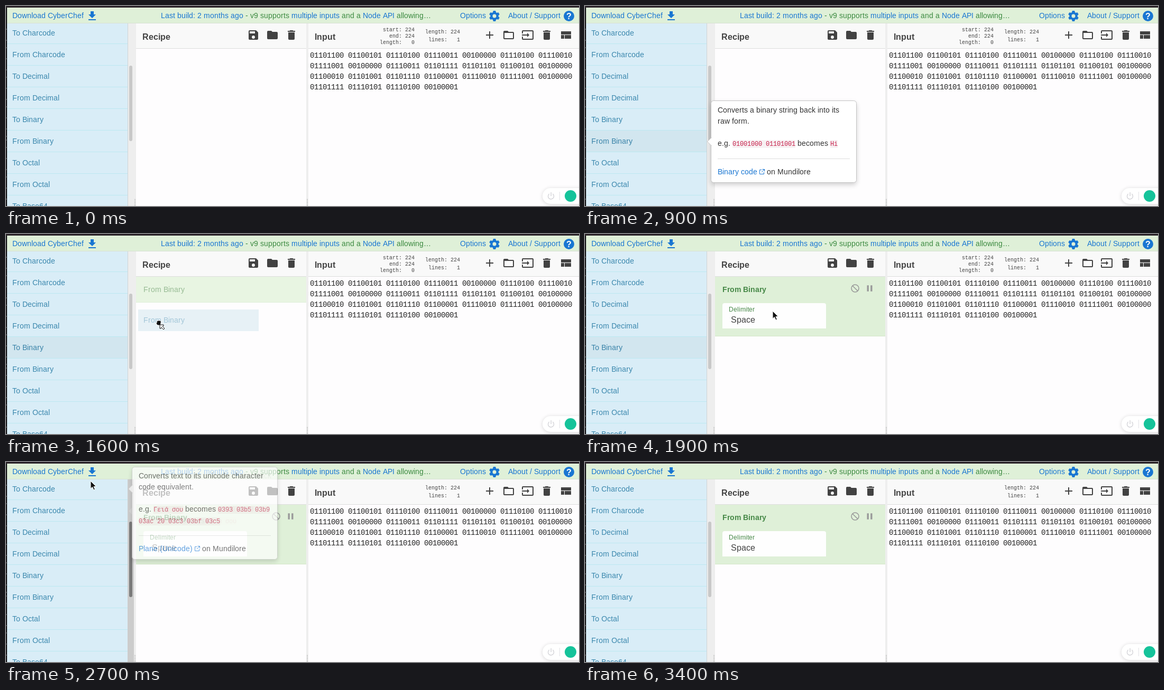
Recreate the animation shown at these times as an HTML page with a canvas. Size 1084 by 379 pixels, loop 3.6 s.

```html
<!DOCTYPE html>
<html lang="en">
<head>
<meta charset="utf-8">
<title>Recipe builder</title>
<style>
  html, body { margin: 0; width: 100%; height: 100%; overflow: hidden; background: #fff; }
  canvas { display: block; }
</style>
</head>
<body>
<canvas id="stage" width="1084" height="379"></canvas>
<script>
const W = 1084, H = 379, LOOP = 3600, STEP = 100;
const stage = document.getElementById('stage').getContext('2d');
let ctx = stage;

const SANS = '"Liberation Sans", Arial, sans-serif';
const MONO = '"Liberation Mono", "Courier New", monospace';
const body = '14px ' + SANS, bold = 'bold 14px ' + SANS, heading = 'bold 16px ' + SANS;
const code = '12px ' + MONO;
const BLUE = '#1976d2', GREEN = '#3c8a40', ROW_TEXT = '#3a87ad', DARK = '#424242';

const ICONS = {
  download: 'M19 9h-4V3H9v6H5l7 7 7-7zM5 18v2h14v-2H5z',
  save: 'M17 3H5c-1.1 0-2 .9-2 2v14c0 1.1.9 2 2 2h14c1.1 0 2-.9 2-2V7l-4-4zm-5 16c-1.7 0-3-1.3-3-3s1.3-3 3-3 3 1.3 3 3-1.3 3-3 3zm3-10H5V5h10v4z',
  folder: 'M10 4H4c-1.1 0-2 .9-2 2v12c0 1.1.9 2 2 2h16c1.1 0 2-.9 2-2V8c0-1.1-.9-2-2-2h-8l-2-2z',
  open: 'M20 6h-8l-2-2H4c-1.1 0-2 .9-2 2v12c0 1.1.9 2 2 2h16c1.1 0 2-.9 2-2V8c0-1.1-.9-2-2-2zm0 12H4V8h16v10z',
  bin: 'M6 19c0 1.1.9 2 2 2h8c1.1 0 2-.9 2-2V7H6v12zM19 4h-3.5l-1-1h-5l-1 1H5v2h14V4z',
  add: 'M19 13h-6v6h-2v-6H5v-2h6V5h2v6h6v2z',
  input: 'M21 3H3c-1.1 0-2 .9-2 2v4h2V5h18v14H3v-4H1v4c0 1.1.9 2 2 2h18c1.1 0 2-.9 2-2V5c0-1.1-.9-2-2-2zM11 16l4-4-4-4v3H1v2h10v3z',
  layout: 'M3 19h6v-7H3v7zm7 0h12v-7H10v7zM3 5v6h19V5H3z',
  pause: 'M6 19h4V5H6v14zm8-14v14h4V5h-4z'
};

function rect(x, y, w, h, color) {
  ctx.fillStyle = color;
  ctx.fillRect(x, y, w, h);
}

function rounded(x, y, w, h, r, color) {
  ctx.beginPath();
  ctx.roundRect(x, y, w, h, r);
  ctx.fillStyle = color;
  ctx.fill();
}

function disc(x, y, r, color) {
  ctx.beginPath();
  ctx.arc(x, y, r, 0, Math.PI * 2);
  ctx.fillStyle = color;
  ctx.fill();
}

function stroke(path, color, width) {
  ctx.strokeStyle = color;
  ctx.lineWidth = width;
  ctx.stroke(new Path2D(path));
}

function shape(path, x, y, scale, color, outline) {
  ctx.save();
  ctx.translate(x, y);
  ctx.scale(scale, scale);
  const p = new Path2D(path);
  ctx.fillStyle = color;
  ctx.fill(p);
  if (outline) {
    ctx.strokeStyle = outline;
    ctx.lineWidth = 1;
    ctx.stroke(p);
  }
  ctx.restore();
}

const icon = (name, x, y, color = DARK, scale = 1) => shape(ICONS[name], x, y, scale, color);

// Glyphs advance by whole pixels, as hinted text does.
const advances = new Map();
function advance(font, a, b) {
  const key = font + a + b;
  if (!advances.has(key)) {
    const width = s => ctx.measureText(s).width;
    const kern = b ? width(a + b) - width(a) - width(b) : 0;
    advances.set(key, Math.round(width(a)) + Math.round(kern));
  }
  return advances.get(key);
}

function text(str, x, y, font, color) {
  ctx.font = font;
  ctx.fillStyle = color;
  const chars = [...str];
  chars.forEach((ch, i) => {
    ctx.fillText(ch, x, y);
    x += advance(font, ch, chars[i + 1] || '');
  });
  return x;
}

// Text made of [string, style] runs on one line.
function runs(list, x, y) {
  for (const [str, style] of list) {
    if (style === 'code') {
      rect(x, y - 11, str.length * 7, 15, '#f7f1f3');
      x = text(str, x, y, code, '#c7254e');
    } else {
      x = text(str, x, y, body, style || '#333');
    }
  }
  return x;
}

function layer(draw) {
  const c = document.createElement('canvas');
  c.width = W;
  c.height = H;
  ctx = c.getContext('2d');
  draw();
  ctx = stage;
  return c;
}

function gear(x, y) {
  ctx.save();
  ctx.translate(x, y);
  disc(0, 0, 7.4, BLUE);
  for (let i = 0; i < 6; i++) {
    ctx.rotate(Math.PI / 3);
    ctx.beginPath();
    ctx.moveTo(-3.4, -6);
    ctx.lineTo(-2.1, -10);
    ctx.lineTo(2.1, -10);
    ctx.lineTo(3.4, -6);
    ctx.fill();
  }
  disc(0, 0, 3.5, '#dff0d8');
  ctx.restore();
}

function banner() {
  rect(0, 0, W, 3, '#2a2328');
  rect(2, 3, W - 2, 29, '#dff0d8');
  rect(2, 32, W - 2, 1, '#d8e2d4');
  text('Download CyberChef', 12, 23, body, BLUE);
  icon('download', 151, 7, BLUE);
  runs([['Last build: 2 months ago', BLUE], [' - v9 supports ', GREEN], ['multiple inputs', BLUE],
    [' and a ', GREEN], ['Node API', BLUE], [' allowing…', GREEN]], 293, 23);
  text('Options', 859, 23, body, BLUE);
  gear(924, 19);
  text('About / Support', 950, 23, body, BLUE);
  disc(1065, 19, 10, BLUE);
  text('?', 1060, 25, heading, '#fff');
}

function operations() {
  rect(0, 3, 2, H, '#131316');
  for (let y = 36; y < H; y += 7) {
    if (Math.sin(y * 12.9) > .35) rect(0, y, 1, 2, '#77777c');
  }
  rect(2, 33, 228, H, '#d9edf7');
  ['To Charcode', 'From Charcode', 'To Decimal', 'From Decimal', 'To Binary',
    'From Binary', 'To Octal', 'From Octal', 'To Base64'].forEach((name, i) => {
    text(name, 12, 56 + i * 41, body, ROW_TEXT);
    rect(2, 71 + i * 41, 228, 1, '#bce8f1');
  });
  rect(230, 33, 1, H, '#cfd4d6');
  rect(231, 33, 15, H, '#eee');
}

function panels() {
  rect(246, 33, W - 246, H, '#fefdfe');
  rect(246, 33, W - 246, 47, '#f9f9f9');
  rect(246, 80, W - 246, 1, '#ddd');
  rect(568, 33, 4, H, '#eee');
  for (let y = 366; y < H; y += 3) {
    rect(243, y, 2, 1, '#aaa');
    rect(569, y, 2, 1, '#aaa');
  }
  text('Recipe', 258, 64, heading, DARK);
  text('Input', 584, 64, heading, DARK);
  ['save', 'folder', 'bin'].forEach((name, i) => icon(name, 456 + i * 36, 43));
  ['add', 'open', 'input', 'bin', 'layout'].forEach((name, i) => icon(name, 903 + i * 36, 43));
  stats(['length: 224', ' lines:   1'], 793, 52, 15);
  ['01101100 01100101 01110100 01110011 00100000 01110100 01110010',
    '01111001 00100000 01110011 01101111 01101101 01100101 00100000',
    '01100010 01101001 01101110 01100001 01110010 01111001 00100000',
    '01101111 01110101 01110100 00100001'
  ].forEach((line, i) => text(line, 575, 98 + i * 20, '14px ' + MONO, '#222'));
}

function stats(lines, x, y, pitch) {
  lines.forEach((line, i) => text(line, x, y + i * pitch, '10px ' + MONO, '#444'));
}

function assistant() {
  ctx.save();
  ctx.shadowColor = 'rgba(0,0,0,.16)';
  ctx.shadowBlur = 7;
  ctx.shadowOffsetY = 1;
  rounded(1015, 345, 90, 30, 15, '#fff');
  ctx.restore();
  ctx.beginPath();
  ctx.arc(1031, 360.5, 5.5, -Math.PI * .3, Math.PI * 1.3);
  ctx.strokeStyle = '#d0d0d5';
  ctx.lineWidth = 1.3;
  ctx.stroke();
  rect(1030.5, 353, 1.3, 7, '#d0d0d5');
  rect(1047, 352, 1, 16, '#e2e2e6');
  disc(1068, 360, 11, '#15c39a');
}

const page = layer(() => {
  operations();
  panels();
  banner();
  assistant();
});

function tooltip({ top, height, arrow, lines, link }) {
  return layer(() => {
    const box = new Path2D();
    box.roundRect(238.5, top + .5, 275, height, 5);
    ctx.save();
    ctx.shadowColor = 'rgba(0,0,0,.2)';
    ctx.shadowBlur = 10;
    ctx.shadowOffsetY = 4;
    ctx.fillStyle = '#fff';
    ctx.fill(box);
    ctx.restore();
    ctx.strokeStyle = '#c4c4c4';
    ctx.stroke(box);
    shape(`M239.5 ${arrow - 8}L231.5 ${arrow}L239.5 ${arrow + 8}`, 0, 0, 1, '#fff', '#c4c4c4');
    rect(239, arrow - 7, 2, 14, '#fff');
    lines.forEach(([dy, list]) => runs(list, 251, top + dy));
    const base = top + height - 15;
    rect(251, base - 30, 250, 1, '#ddd');
    const end = text(link, 251, base, body, BLUE);
    ctx.save();
    ctx.translate(end + 4, base - 10);
    stroke('M4 1.5H.5V9.5H8.5V6M5.5 .5H9.5V4.5M9.5 .5L4 6', BLUE, 1);
    ctx.restore();
    text('on Mundilore', end + 18, base, body, '#333');
  });
}

const binaryTip = tooltip({
  top: 179, height: 155, arrow: 257, link: 'Binary code',
  lines: [
    [23, [['Converts a binary string back into its']]],
    [44, [['raw form.']]],
    [86, [['e.g. '], ['01001000 01101001', 'code'], [' becomes '], ['Hi', 'code']]]
  ]
});
const toCharTip = tooltip({
  top: 9, height: 175, arrow: 51, link: 'Plane (Unicode)',
  lines: [
    [22, [['Converts text to its unicode character']]],
    [43, [['code equivalent.']]],
    [85, [['e.g. '], ['Γειά σου', 'code'], [' becomes '], ['0393 03b5 03b9', 'code']]],
    [107, [['03ac 20 03c3 03bf 03c5', 'code']]]
  ]
});
const fromCharTip = tooltip({
  top: 9, height: 175, arrow: 93, link: 'Plane (Unicode)',
  lines: [
    [22, [['Converts unicode character codes back']]],
    [43, [['into text.']]],
    [85, [['e.g. '], ['0393 03b5 03b9 03ac 20 03c3', 'code']]],
    [107, [['03bf 03c5', 'code'], [' becomes '], ['Γειά σου', 'code']]]
  ]
});

// Piecewise linear value over time from [time, ...values] keys.
function track(keys, t, field = 1) {
  const next = keys.findIndex(k => k[0] > t);
  if (next === 0) return keys[0][field];
  if (next < 0) return keys[keys.length - 1][field];
  const a = keys[next - 1], b = keys[next];
  return a[field] + (b[field] - a[field]) * (t - a[0]) / (b[0] - a[0]);
}

const focusKeys = [[1100, 0], [1300, 1], [1400, 1], [1600, 0], [2000, 0], [2200, 1], [3200, 1], [3400, 0]];
const binaryTipKeys = [[600, 0], [700, .03], [850, 1], [1400, 1], [1600, 0]];
const fromCharKeys = [[2400, 0], [2500, .3], [2600, .7], [2700, .14], [2800, 0]];
const toCharKeys = [[2500, 0], [2600, .5], [2700, .62], [2800, .1], [2900, 0]];
const dragKeys = [[1500, 130, 215], [1600, 289, 170], [1700, 330, 165]];
const arrowKeys = [[1800, 345, 150], [1900, 355, 146], [2000, 355, 146], [2200, 368, 141], [2400, 368, 141],
  [2500, 232, 95], [2600, 180, 60], [2700, 160, 36], [2800, 160, 12], [2900, 165, -8]];
const hovers = [[700, 1500, 5], [1500, 2300, 4], [2500, 2600, 1], [2600, 2700, 0]];

function scrollbar(focus) {
  const mix = (a, b) => Math.round(a + (b - a) * focus);
  const gray = v => `rgb(${v},${v},${v})`;
  if (focus) rect(230, 33, 12, H, `rgba(204,204,204,${focus})`);
  rounded(233, 113, 6, 143, 3, gray(mix(200, 122)));
}

function operation(t) {
  if (t < 1600) return;
  if (t < 1800) {
    rect(246, 81, 322, 48, '#e8f5e2');
    rect(246, 129, 322, 1, '#dfeeda');
    text('From Binary', 260, 110, body, '#97bb94');
    return;
  }
  rect(246, 81, 322, 112, '#dff0d8');
  rect(246, 193, 322, 1, '#d3e6c8');
  text('From Binary', 260, 110, bold, '#468847');
  ctx.beginPath();
  ctx.arc(511, 103, 7, 0, Math.PI * 2);
  ctx.strokeStyle = '#999';
  ctx.lineWidth = 1.6;
  ctx.stroke();
  stroke('M506 98L516 108', '#999', 1.6);
  icon('pause', 528.5, 93, '#999', .833);
  rounded(260, 131, 196, 48, [4, 4, 0, 0], '#fefefe');
  text('Delimiter', 272, 147, '12px ' + SANS, '#468847');
  text('Space', 276, 168, '16px ' + SANS, DARK);
}

function openHand(x, y) {
  shape('M-4 7L-7 2Q-8 0-6 0L-4 2L-6-4Q-5-6-4-5L-2-1L-2-6Q-1-8 0-6L1-1L2-6Q3-7 4-5L4 0L6-4Q8-4 7-2L5 7Z', x, y, 1, '#fff', '#111');
}

function dragging(x, y) {
  rect(x - 39, y - 27, 228, 41, 'rgba(229,240,246,.92)');
  text('From Binary', x - 29, y - 2, body, '#a2c6d8');
  shape('M-4-1Q-4-4-2-5L3-5Q5-4 4 0L3 4H-2L-5 1Z', x, y - 1, 1, '#111', '#fff');
  shape('M2 2H9V4L7 5L11 9L9 11L5 7L4 9H2Z', x, y, 1, '#fff', '#111');
}

function arrow(x, y) {
  shape('M0 0V14.5L3.4 11.4L6 17L8.4 16L6 10.5H10.5Z', x, y, 1, '#111', '#fff');
}

function fade(image, alpha) {
  if (alpha <= 0) return;
  ctx.globalAlpha = alpha;
  ctx.drawImage(image, 0, 0);
  ctx.globalAlpha = 1;
}

function render(t) {
  ctx.drawImage(page, 0, 0);
  for (const [from, to, row] of hovers) {
    if (t >= from && t < to) rect(2, Math.max(33, 31 + row * 41), 228, row ? 40 : 38, 'rgba(0,0,0,.03)');
  }
  scrollbar(track(focusKeys, t));
  if (t < 2300) {
    stats(['start: 224', '  end: 224'], 713, 48, 12);
    stats(['length:   0'], 707, 72, 0);
  }
  operation(t);
  fade(binaryTip, track(binaryTipKeys, t));
  fade(fromCharTip, track(fromCharKeys, t));
  fade(toCharTip, track(toCharKeys, t));

  if (t >= 1200 && t < 1500) openHand(49, 259);
  else if (t >= 1500 && t < 1800) dragging(Math.round(track(dragKeys, t)), Math.round(track(dragKeys, t, 2)));
  else if (t >= 1800 && t < 3000) arrow(track(arrowKeys, t), track(arrowKeys, t, 2));
}

function tick() {
  const t = performance.now() % LOOP;
  render(Math.floor(t / STEP) * STEP);
  requestAnimationFrame(tick);
}
tick();
</script>
</body>
</html>
```
